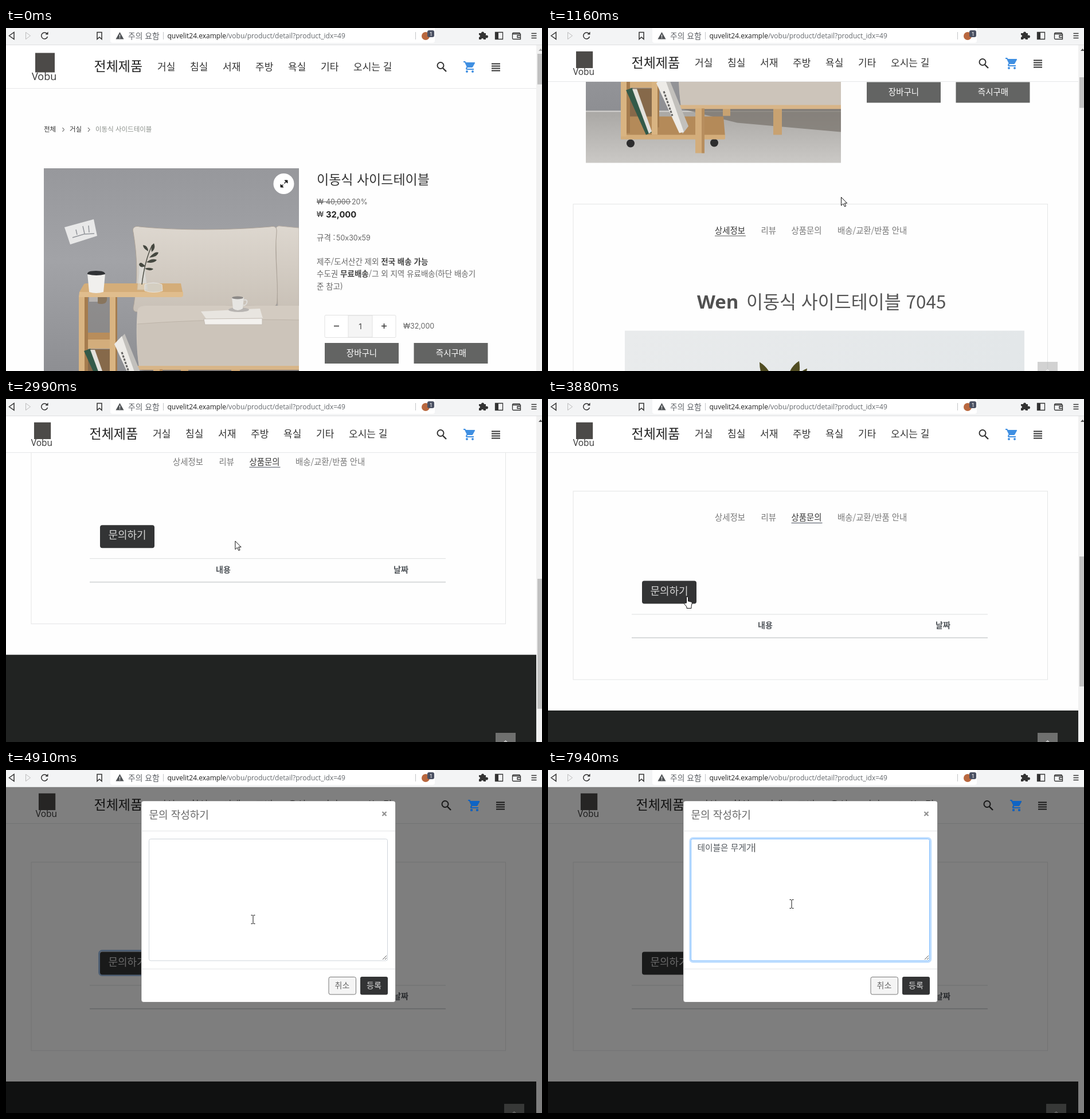
Write an HTML page that moves like this. It is 935 px wide and 599 px high and loops after 8000 ms.

```html
<!DOCTYPE html>
<html lang="ko">
<head>
<meta charset="utf-8">
<style>
  html, body { margin: 0; width: 100%; height: 100%; overflow: hidden; background: #fefefe; }
  svg { display: block; }
  text { font-family: "Noto Sans CJK KR", "Noto Sans CJK", "Noto Sans KR", sans-serif; white-space: pre; }
  .open { font-family: "Open Sans", sans-serif; }
  .num { font-family: Inter, sans-serif; }
  .mid { text-anchor: middle; }
  .line { fill: none; stroke: #333; }
</style>
</head>
<body>
<svg id="stage" width="100%" height="100%" viewBox="0 0 935 599">
  <defs>
    <linearGradient id="wall" x2="0" y2="1"><stop stop-color="#97989c"/><stop offset=".45" stop-color="#a2a3a7"/><stop offset="1" stop-color="#8d8e92"/></linearGradient>
    <linearGradient id="floor" x2="0" y2="1"><stop stop-color="#a9a7a4"/><stop offset="1" stop-color="#cbc9c6"/></linearGradient>
    <linearGradient id="linen" x2="0" y2="1"><stop stop-color="#ddd7cf"/><stop offset="1" stop-color="#c9c1b7"/></linearGradient>
    <linearGradient id="sky" x2="1" y2="1"><stop stop-color="#e9ebec"/><stop offset="1" stop-color="#dde3e6"/></linearGradient>
    <path id="cart" d="M7 18a2 2 0 100 4 2 2 0 000-4zM1 2v2h2l3.6 7.59-1.35 2.45C4.5 15.4 5.5 17 7 17h12v-2H7.42c-.2 0-.3-.2-.22-.37l.9-1.63h7.45c.75 0 1.41-.41 1.75-1.03l3.58-6.49A1 1 0 0020 4H5.21l-.94-2H1zm16 16a2 2 0 100 4 2 2 0 000-4z"/>
  </defs>
  <rect width="935" height="599" fill="#fefefe"/>

  <g id="page">
    <g font-size="11.5" fill="#333">
      <text x="66" y="181">전체</text><text x="111" y="181">거실</text>
      <text x="156" y="181" fill="#8c918c">이동식 사이드테이블</text>
      <path class="line" d="M98.500 174l3 3.500-3 3.500M143 174l3 3.500-3 3.500"/>
    </g>

    <g transform="translate(0 91)">
      <svg x="66" y="154" width="445" height="446" viewBox="66 154 445 446">
        <rect x="66" y="154" width="445" height="360" fill="url(#wall)"/>
        <rect x="66" y="509" width="445" height="92" fill="url(#floor)"/>
        <path d="M66 510H511" stroke="#d3d2d0" stroke-width="2"/>
        <path d="M230 505H511V546L330 530Z" fill="#77716a" opacity=".7"/>
        <!-- note on the wall -->
        <path d="M102 257l51-14 6 29-47 15z" fill="#e8e8e8"/>
        <path d="M116 275l20-6 18-1M124 270l-2-9M137 268l-3-13M145 266l-1-12" fill="none" stroke="#92959a" stroke-width="1.500"/>
        <!-- sofa -->
        <path d="M470 264c0-8 4-10 9-9l32 3V397H474z" fill="url(#linen)" stroke="#b3aaa0"/>
        <path d="M222 266c-3-9 4-12 11-10 70 7 160 6 228 0 8-2 12 1 11 10-4 40 3 80 1 119 0 10-4 11-14 10-70-2-160 0-221 9-15 3-18-1-15-12 7-45 6-85-1-126z" fill="url(#linen)" stroke="#aaa197"/>
        <path d="M229 404c1-8 7-10 18-10H511V500H232c-5-30-5-70-3-96z" fill="#d3cbc1"/>
        <path d="M229 426c90-7 190-9 282-7V500H232c-3-20-4-50-3-74z" fill="#ccc4ba"/>
        <path d="M229 426c90-7 190-9 282-7" fill="none" stroke="#bdb4a9"/>
        <g fill="#c8a271">
          <path d="M305 504h13v14h-13zM393 505h15v46h-15z"/>
          <path d="M230 499H511v7H230z" fill="#d8b588"/>
        </g>
        <!-- rolling table -->
        <circle cx="144" cy="566" r="7" fill="#2d2d2e"/><circle cx="290" cy="565" r="7" fill="#2d2d2e"/>
        <path d="M145 378h27v9h-27z" fill="#e4e2df"/><path d="M160 378h16c2 14-8 14-16 12z" fill="#8f7148"/>
        <path d="M138 379h47v70h-47z" fill="#7f7a75" opacity=".45"/>
        <path d="M136 470h48v60h-48z" fill="#86694a"/>
        <path d="M136 519H306l3 35H127z" fill="#b48a59"/>
        <path d="M127 551H309v6q0 2-3 2H127z" fill="#d4ad7a"/>
        <path d="M136 441h48v12h-48z" fill="#b88d5b"/><path d="M131 453h52v16h-52z" fill="#d3ad7c"/>
        <path d="M127 376h10v178h-10zM181 376h10v175h-10z" fill="#d9b482"/>
        <path d="M137 378h6v170h-6zM191 378h3v160h-3z" fill="#a57c4e"/>
        <path d="M136 473l11-4 34 78-10 4z" fill="#335a49"/><path d="M147 471l8 0 26 74-5 4z" fill="#e3e1dc"/>
        <path d="M189 461l18-18 38 93-10 13z" fill="#c2c0bc"/><path d="M189 461l13-14 35 99-8 2z" fill="#edebe7"/>
        <path d="M202 475l15 43" stroke="#656463" stroke-width="3" stroke-dasharray="4 2"/>
        <path d="M135 358q1-3 5-3H305l3 15H128z" fill="#d4ad79"/><path d="M128 370H309v5q0 4-4 4H127z" fill="#e0bd8d"/>
        <path d="M257 505h16v78h-16z" fill="#d3ad7b"/><path d="M268 505h5v78h-5z" fill="#b78e5e"/>
        <!-- things on the table and seat -->
        <path d="M142 338h31l-3 32q-13 4-25 0z" fill="#f0efed"/><path d="M142 339q-1-6 15-6t16 6q-15 4-31 0z" fill="#303235"/>
        <path d="M232 321h10l1 14 4 31h-18l3-30z" fill="#e5e9e8" opacity=".5" stroke="#c8cccb"/>
        <path d="M237 357q5-42 18-69" fill="none" stroke="#4b4c43" stroke-width="1.500"/>
        <g fill="#454840">
          <path d="M254 300q-2-12 4-15 4 9-4 15zM248 299q-9-5-9-11 9 1 9 11zM250 310q10-12 16-9-2 8-16 9zM245 318q10-8 18-4-5 7-18 4zM243 325q-9-10-11-3 2 7 11 3zM242 329q10-3 15 1-7 5-15-1z"/>
        </g>
        <path d="M242 357q15-6 30 0l1 11q-15 5-31 0z" fill="#d4d9da" opacity=".75" stroke="#f0f2f2"/>
        <path d="M340 404l10 14 98-2-5-17z" fill="#e8e5e0"/><path d="M345 417l102-1v11H347z" fill="#f3f1ee" stroke="#c2bbb3"/>
        <ellipse cx="406" cy="401" rx="18" ry="4" fill="#b7b4b1"/>
        <path d="M394 379h21l-2 20q-9 6-17 0z" fill="#e6e5e2"/><ellipse cx="404" cy="380" rx="10" ry="2.500" fill="#8c8987"/>
        <path d="M415 384q7-1 5 5-2 5-6 4" fill="none" stroke="#deddda" stroke-width="2"/>
      </svg>
    </g>
    <circle cx="484.500" cy="272" r="18" fill="#fff"/>
    <path d="M491 266v5l-5-5zM479 278v-5l5 5z" fill="#222" stroke="#222"/><path d="M480 277l9-9" stroke="#222" stroke-width="1.500" stroke-dasharray="5 2.700"/>

    <text x="542" y="272.500" font-size="23" fill="#333">이동식 사이드테이블</text>
    <g class="num" fill="#666" font-size="12.500">
      <text class="num" x="542" y="308">₩</text><text class="num" x="558" y="308">40,000</text><text class="num" x="603" y="308">20%</text>
      <path d="M542 303.500H602" stroke="#666"/>
      <text class="num" x="542" y="330" fill="#333">₩</text><text class="num" x="558" y="330.500" font-size="14.800" font-weight="700" fill="#222">32,000</text>
      <text class="num" x="576" y="371">50x30x59</text>
      <text class="num" x="693" y="525">₩32,000</text>
    </g>
    <g font-size="13.500" fill="#666">
      <text x="542" y="371">규격 :</text>
      <text x="542" y="412.500">제주/도서산간 제외 <tspan font-weight="700" fill="#444">전국 배송 가능</tspan></text>
      <text x="542" y="434">수도권 <tspan font-weight="700" fill="#444">무료배송</tspan>/그 외 지역 유료배송(하단 배송기</text>
      <text x="542" y="455.500">준 참고)</text>
    </g>
    <rect x="556" y="501.500" width="124" height="39" rx="2" fill="#fff" stroke="#e1e1e1"/>
    <path d="M597 502h42v38h-42z" fill="#f5f5f5" stroke="#e1e1e1"/>
    <path d="M572 520.500h9M655 520.500h9M659.500 516v9" stroke="#333" stroke-width="1.500"/>
    <text class="num mid" x="618" y="526" font-size="13.500" fill="#444">1</text>
    <path d="M556 550h129v36H556zM711.500 550h129v36h-129z" fill="#636463"/>
    <g class="mid" font-size="14.500" font-weight="500" fill="#fff"><text x="620.500" y="572.500">장바구니</text><text x="776.500" y="572.500">즉시구매</text></g>

    <rect id="panel" x="44" y="763" width="827.500" height="329" fill="#fefefe" stroke="#e4e5e6"/>
    <g font-size="14.400" fill="#777">
      <text id="tabInfo" x="291" y="814">상세정보</text><text x="371.500" y="814">리뷰</text>
      <text id="tabAsk" x="424.500" y="814">상품문의</text><text x="505" y="814">배송/교환/반품 안내</text>
      <path id="lineInfo" d="M291 818.500h54" stroke="#555"/><path id="lineAsk" d="M424.500 818.500h54" stroke="#444b58"/>
    </g>
    <g id="detail">
      <text class="open" x="260" y="945.500" font-size="33" font-weight="700" fill="#505050">Wen</text>
      <text x="346" y="945.500" font-size="31.500" fill="#555">이동식 사이드테이블 7045</text>
      <rect x="134" y="984" width="697" height="1400" fill="url(#sky)"/>
      <g fill="#514d22">
        <path d="M369 1039q22 13 26 45-26-13-26-45zM438 1037q-22 14-20 44 26-11 20-44zM452 1050q-32 14-37 47 32-9 37-47zM412 1062q-13 26-2 57 15-30 2-57zM354 1079q35 5 50 34-37-3-50-34zM467 1090q-36 4-52 35 37-2 52-35z"/>
        <path d="M407 1080q4 60 1 130M390 1080q15 50 16 100M424 1080q-14 50-14 110" fill="none" stroke="#514d22" stroke-width="3"/>
      </g>
    </g>
    <g id="ask">
      <rect id="ring" x="162.500" y="917.500" width="98" height="43" rx="5" fill="none" stroke="#9dbfe8" stroke-width="3"/>
      <rect x="164" y="919.500" width="95" height="40" rx="4" fill="#333435"/>
      <text class="mid" x="211.500" y="943.500" font-size="18" fill="#d6d6d6">문의하기</text>
      <path d="M146 978h621" stroke="#dcdedf"/><path d="M146 1019h621" stroke="#d8dadb" stroke-width="2"/>
      <g class="mid" font-size="14" font-weight="700" fill="#50555a"><text x="379" y="1002">내용</text><text x="689" y="1002">날짜</text></g>
    </g>
    <rect id="footer" y="1146" width="925" height="700" fill="#212322"/>
  </g>

  <g id="top">
    <path d="M854 583h35v20h-35z" fill="#afafaf" fill-opacity=".55"/>
    <path d="M867 601l4.500-4 4.500 4" fill="none" stroke="#fff" stroke-opacity=".7" stroke-width="1.500"/>
  </g>
  <rect id="status" y="598" width="303" height="2" fill="#fff"/>

  <rect id="headBack" width="935" fill="#fff"/>
  <path id="headLine" d="M0 .5H935" stroke="#e6e7e8"/>
  <g id="head">
    <g id="logo">
      <rect x="51" y="43.500" width="34" height="34" fill="#4c4a48"/>
      <text class="open" x="45" y="91" font-size="18" fill="#333">Vobu</text>
    </g>
    <g id="menu" fill="#333"><text x="153.500" y="74.800" font-size="23" fill="#222">전체제품</text></g>
    <g id="icons">
      <circle class="line" cx="758" cy="65.500" r="5.500" stroke-width="2"/><path class="line" d="M762 70l6 6" stroke-width="2.400"/>
      <use href="#cart" x="797" y="56" fill="#3f8fe2"/>
      <path class="line" d="M847 62.500h15M847 66.500h15M847 70.500h15M847 74.500h15" stroke-width="2"/>
    </g>
  </g>

  <g id="bar">
    <path d="M925 30h10v569h-10z" fill="#f1f1f1"/>
    <path id="arrow" d="M929 40l3.500-4 3.500 4z"/>
    <rect id="thumb" x="927" width="8" fill="#c1c1c1"/>
  </g>

  <rect id="shade" y="30" width="935" height="569"/>
  <use id="litCart" href="#cart" x="805" y="50" fill="#0f64c4"/>
  <g id="modal">
    <rect x="236" y="54" width="443.500" height="351.500" rx="4" fill="#fff" stroke="#555" stroke-opacity=".5"/>
    <path d="M236 106.500h443M236 347.500h443" stroke="#e3e5e7"/>
    <text x="249.500" y="85" font-size="18" fill="#666">문의 작성하기</text>
    <path d="M656.500 73l7 7m0-7l-7 7" stroke="#909090" stroke-width="2.200"/>
    <rect id="glow" x="248" y="119" width="419.500" height="216" rx="5" fill="none" stroke="#bfdeff" stroke-width="3.500"/>
    <rect id="field" x="249.500" y="120.500" width="416" height="212.500" rx="3" fill="#fff"/>
    <path d="M657 331l7-7M661 331l3-3" stroke="#555"/>
    <text id="typed" x="260.500" y="141" font-size="14.700" fill="#50565c"></text>
    <path id="caret" d="M0 128v15.500" stroke="#222"/>
    <rect x="563" y="361.500" width="47.500" height="30.500" rx="3" fill="#f4f4f4" stroke="#777"/>
    <rect x="618" y="361" width="48" height="31.500" rx="3" fill="#333435"/>
    <g class="mid" font-size="14"><text x="586.500" y="381" fill="#666">취소</text><text x="642" y="381" fill="#ddd">등록</text></g>
  </g>

  <!-- browser toolbar -->
  <path d="M0 0H935V30H0z" fill="#f3f4f5"/><path d="M0 29.500H935" stroke="#dedfe0"/>
  <path d="M182 0h566v22q0 4-4 4H186q-4 0-4-4z" fill="#fff"/>
  <path class="line" d="M5.500 13.500l8.500-6v12zM159 7.500h8v12l-4-3.500-4 3.500zM71.500 10a5.500 5.500 0 10 1 5" stroke-width="1.500"/>
  <path d="M73.500 6.500v5h-5z" fill="#333"/>
  <path class="line" d="M42.500 13.500l-8-6v12z" style="stroke:#bbb"/>
  <path d="M198.500 7l7 12.500h-14z" fill="#505356"/><path d="M198.500 11.500v4M198.500 16.500v1.500" stroke="#fff" stroke-width="1.300"/>
  <text x="213" y="18.500" font-size="13.800" fill="#5f6368">주의 요함</text>
  <path d="M274.500 7v13M714.500 7v13" stroke="#c3c5c7"/>
  <text class="open" x="281.500" y="18" font-size="12" fill="#666a6e"><tspan fill="#222">quvelit24.example</tspan>/vobu/product/detail?product_idx=49</text>
  <circle cx="732" cy="14" r="7" fill="#b9683f"/>
  <rect x="735" y="4" width="12" height="12" rx="3" fill="#4b5163"/><text class="num mid" x="741" y="13.500" font-size="9" fill="#fff">1</text>
  <path d="M825 9h4a2.500 2.500 0 115 0h3v4a2.500 2.500 0 110 4v3h-4a2 2 0 10-4 0h-4v-4a2 2 0 100-4z" fill="#333"/>
  <path class="line" d="M853.500 7.500h13v12h-13zM885 8.500h11v2h1.500v9H885q-1.500 0-1.500-1.500V10q0-1.500 1.500-1.500zM892 13h5.500v3.500H892zM884 10.500h12" stroke-width="1.300"/>
  <path d="M854 8h5v11h-5z" fill="#333"/>
  <path class="line" d="M916.500 9.500h9M916.500 13.500h9M916.500 17.500h9" stroke-width="1.500"/>

  <g id="cursor" fill="#fff" stroke="#111">
    <path id="pointer" d="M.5.500v14.500l3.500-3.200 2.500 5.200 2.200-1-2.400-5h4.400z"/>
    <path id="hand" d="M-1.500 11V2c0-2 3-2 3 0v6l5 1.200c1.300.4 1.800 1 1.800 2.300l-1.300 5.500v3.500H-1V18l-4-5c-1.200-1.600 1-2.700 2-1.500z"/>
    <path id="beam" d="M-3.500-7.500H-1L0-6.500 1-7.500h2.500M0-6.500v13M-3.500 7.500H-1l1-1 1 1h2.500" fill="none"/>
  </g>
</svg>
<script>
const $ = id => document.getElementById(id);
const set = (id, attrs) => { for (const k in attrs) $(id).setAttribute(k, attrs[k]); };
const show = (id, on) => set(id, { opacity: +on });
const move = (id, x, y, more = "") => set(id, { transform: `translate(${x} ${y})${more}` });
const ramp = (t, from, to) => Math.min(1, Math.max(0, (t - from) / (to - from)));
const easeOut = p => 1 - (1 - p) ** 2;

// Linear interpolation through [time, ...values] keys
function along(keys, t) {
  const i = keys.findIndex(k => k[0] > t);
  if (i < 1) return (i ? keys.at(-1) : keys[0]).slice(1);
  const a = keys[i - 1], b = keys[i], p = ramp(t, a[0], b[0]);
  return a.slice(1).map((v, j) => v + (b[j + 1] - v) * p);
}

const LOOP = 8000, SWITCH = 2300, OPEN = 4350, FOCUS = 5190;
const scrollKeys = [[560, 0], [740, 91], [1160, 455], [1500, 602], [2660, 602], [3000, 702], [3540, 702], [3800, 602]];
const cursorKeys = [[120, 720, 610], [480, 601, 274], [760, 601, 274], [1160, 511, 295], [1700, 500, 285],
  [2100, 439, 205], [2640, 439, 205], [3340, 360, 290], [3530, 360, 290], [3820, 243, 345], [4330, 243, 345],
  [4890, 431, 261], [4950, 431, 261], [5120, 425, 234]];
const typing = [[6190, "ㅌ"], [6260, "테"], [6390, "텡"], [6460, "테이"], [6590, "테입"], [6690, "테이브"],
  [6790, "테이블"], [6890, "테이블ㅇ"], [6990, "테이블은"], [7120, "테이블은 "], [7520, "테이블은 무"],
  [7590, "테이블은 무게"], [7740, "테이블은 무겍"], [7870, "테이블은 무게가"]];

["거실", "침실", "서재", "주방", "욕실", "기타", "오시는 길"].forEach((name, i) => {
  const label = document.createElementNS("http://www.w3.org/2000/svg", "text");
  label.textContent = name;
  $("menu").append(label);
  label.setAttribute("x", 264 + 57 * i);
  label.setAttribute("y", 73.5);
  label.setAttribute("font-size", 17);
});

function drawPage(t) {
  const [scroll] = along(scrollKeys, t);
  const short = t >= SWITCH, open = t >= OPEN;
  move("page", 0, -scroll);
  set("panel", { height: short ? 329 : 5000 });
  show("detail", short ? 0 : 1 - ramp(t, 2160, SWITCH));
  show("ask", ramp(t, 2330, 2480));
  show("footer", short);
  show("ring", t > 4300 && t < 5110);

  const left = ramp(t, 2180, 2450);
  show("lineInfo", 1 - left);
  show("lineAsk", t > 2100);
  set("tabInfo", { fill: left > .3 ? "#777" : "#333" });
  set("tabAsk", { fill: t > 2100 ? "#333" : "#777" });

  show("top", ramp(scroll, 100, 250));
  move("top", open ? 15 : 0, 0);
  show("status", t > 2100 && t < 2600);
  show("bar", !open);
  set("arrow", { fill: scroll ? "#505050" : "#a3a3a3" });
  set("thumb", short ? { y: 275 + (scroll - 602) * .4, height: 227 } : { y: 45 + scroll * .09, height: 53.5 });
}

function drawHeader(t) {
  const p = easeOut(ramp(t, 640, 940)), bottom = 105 - 12 * p;
  set("headBack", { height: bottom });
  move("headLine", 0, Math.round(bottom));
  move("head", t >= OPEN ? 8 : 0, 0);
  move("logo", 5.1 * p, 3.4 * p, ` scale(${1 - .14 * p})`);
  move("menu", -8 * p, -6.2 * p);
  move("icons", 0, -6 * p);
}

function drawModal(t) {
  const shade = ramp(t, OPEN, OPEN + 150), p = ramp(t, OPEN + 80, OPEN + 380);
  show("litCart", t >= OPEN);
  set("litCart", { opacity: shade });
  set("shade", { opacity: shade / 2 });
  set("modal", { opacity: p });
  move("modal", 0, -50 * (1 - easeOut(p)));

  const focus = ramp(t, FOCUS - 40, FOCUS + 70);
  set("glow", { opacity: focus });
  set("field", { stroke: focus > .5 ? "#80bdff" : "#ced4da" });
  const text = typing.findLast(k => k[0] <= t)?.[1] ?? "";
  if ($("typed").textContent !== text) $("typed").textContent = text;
  const width = text ? $("typed").getComputedTextLength() : 0;
  move("caret", Math.round(261 + width) + .5, 0);
  show("caret", t >= FOCUS && !(t >= 5520 && t < 5920));
}

function drawCursor(t) {
  const [x, y] = along(cursorKeys, t);
  const hand = t > 2080 && t < 2700 || t > 3760 && t < 4420, beam = t > 4600;
  move("cursor", x, y);
  show("cursor", t >= 120);
  show("hand", hand);
  show("beam", beam);
  show("pointer", !hand && !beam);
}

function frame(now) {
  const t = now % LOOP;
  drawPage(t);
  drawHeader(t);
  drawModal(t);
  drawCursor(t);
  requestAnimationFrame(frame);
}
frame(0);
</script>
</body>
</html>
```
